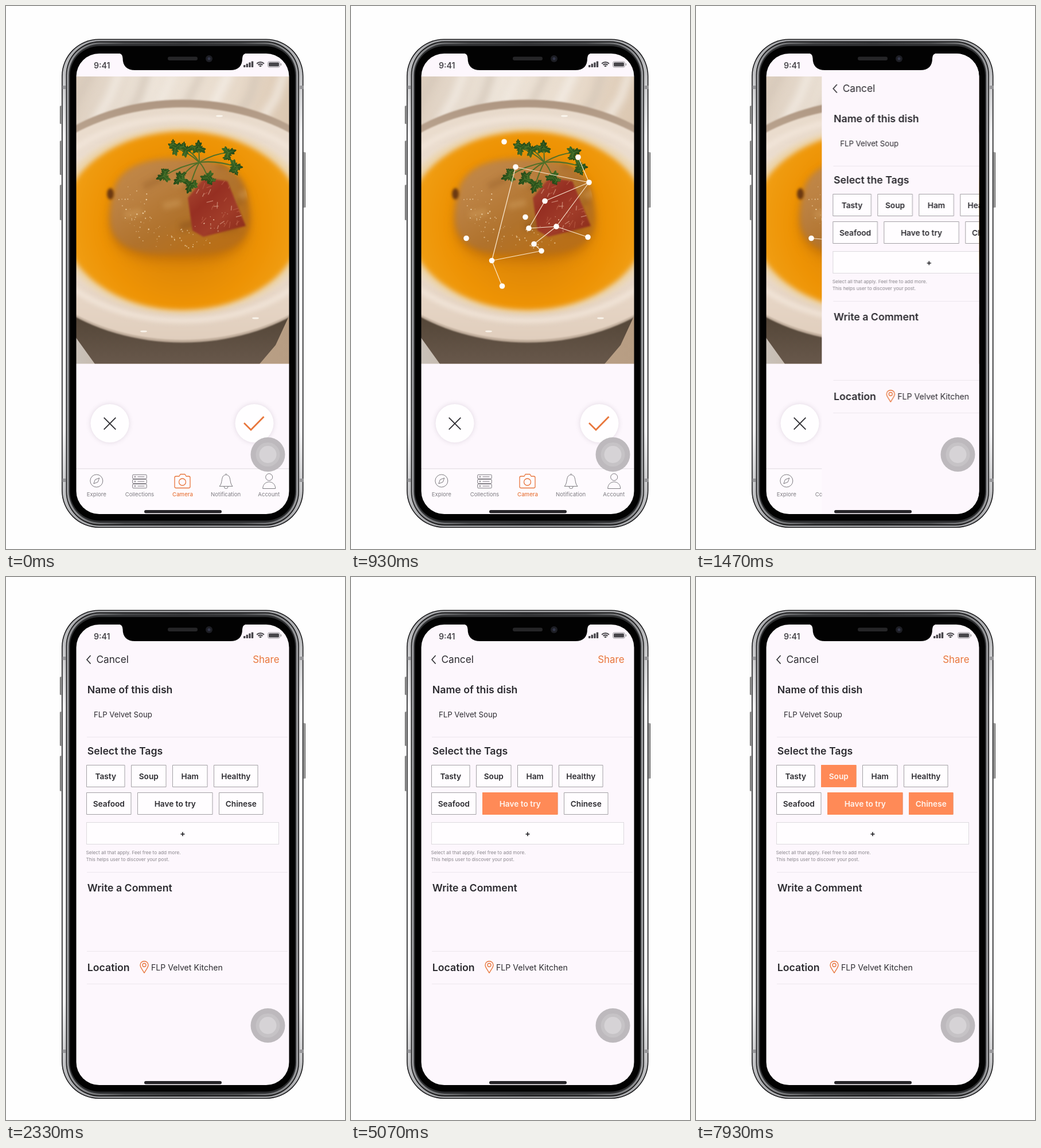
Animation, 591 px wide and 948 px high, one loop 8 s. Source, as an HTML page with a canvas:

```html
<!DOCTYPE html>
<html lang="en">
<head>
<meta charset="utf-8">
<title>Post a dish</title>
<style>
html, body { margin: 0; width: 100%; height: 100%; overflow: hidden; background: #fefefe; }
canvas { display: block; }
</style>
</head>
<body>
<canvas id="stage" width="591" height="948"></canvas>
<script>
const W = 591, H = 948, LOOP = 8000, TAU = Math.PI * 2;
const ORANGE = '#e8763c', PICKED = '#ff8a57', INK = '#2c2b30', GREY = '#7d7b80', PAPER = '#fdf7fd';
const VIEW = { x: 122.5, y: 83, w: 371, h: 804, r: 40 };
const stage = document.getElementById('stage').getContext('2d');
let g = stage;

const clamp = v => Math.min(1, Math.max(0, v));
const span = (t, from, to) => clamp((t - from) / (to - from));
const ease = p => (1 - Math.cos(Math.PI * p)) / 2;

function layer(draw) {
  const c = document.createElement('canvas');
  c.width = W;
  c.height = H;
  g = c.getContext('2d');
  draw();
  g = stage;
  return c;
}

function seeded(seed) {
  return () => (seed = (seed * 16807) % 2147483647) / 2147483647;
}

function fill(color) { g.fillStyle = color; g.fill(); }

function stroke(color, width = 1) {
  g.strokeStyle = color;
  g.lineWidth = width;
  g.stroke();
}

function rect(x, y, w, h, r = 0) {
  g.beginPath();
  g.roundRect(x, y, w, h, r);
}

function oval(x, y, rx, ry = rx) {
  g.beginPath();
  g.ellipse(x, y, rx, ry, 0, 0, TAU);
}

function poly(points, close) {
  g.beginPath();
  points.forEach(([x, y]) => g.lineTo(x, y));
  if (close) g.closePath();
}

// Closed curve with radius(angle), stretched to rx and ry.
function polar(x, y, rx, ry, radius) {
  const points = [];
  for (let a = 0; a < TAU; a += TAU / 90) {
    points.push([x + rx * radius(a) * Math.cos(a), y + ry * radius(a) * Math.sin(a)]);
  }
  poly(points, true);
}

function ramp(x0, y0, x1, y1, ...colors) {
  const grad = g.createLinearGradient(x0, y0, x1, y1);
  colors.forEach((c, i) => grad.addColorStop(i / (colors.length - 1), c));
  return grad;
}

// y is the middle of the capital letters.
function text(s, x, y, size, { weight = 400, color = INK, align = 'left' } = {}) {
  g.font = `${weight} ${size}px Inter, "Open Sans", sans-serif`;
  g.textAlign = align;
  g.fillStyle = color;
  g.fillText(s, x, y + size * 0.364);
}

function soft(blur, draw) {
  g.save();
  g.filter = `blur(${blur}px)`;
  draw();
  g.restore();
}

function leaf(x, y, size, turn) {
  g.save();
  g.translate(x, y);
  g.rotate(turn);
  polar(0, 0, size, size, a => 0.72 + 0.26 * Math.cos(3 * a) + 0.13 * Math.cos(11 * a));
  fill(ramp(-size, -size, size, size, '#4a7328', '#2f581d', '#1c3b12'));
  for (const a of [-2, 0, 2]) {
    poly([[0, 0], [size * 0.7 * Math.cos(a), size * 0.7 * Math.sin(a)]]);
    stroke('rgba(125,160,75,.5)', 0.8);
  }
  g.restore();
}

function herb() {
  const root = [337, 273];
  const tips = [[295, 248], [314, 251], [336, 248], [388, 256], [399, 280], [275, 297], [303, 302], [321, 314], [352, 300]];
  g.lineCap = 'round';
  for (const [x, y] of tips) {
    g.beginPath();
    g.moveTo(...root);
    g.quadraticCurveTo((x + root[0]) / 2, (y + root[1]) / 2 - 7, x, y);
    stroke('#506f28', 2);
  }
  for (const [x, y] of tips) {
    const out = Math.atan2(y - root[1], x - root[0]);
    leaf(x, y, 13, out);
    leaf(x + 7 * Math.sin(out), y + 8 * Math.cos(out), 8, out + 1);
  }
}

function bowl() {
  soft(1.2, () => {
    oval(308, 375.5, 304, 212);
    fill(ramp(0, 163, 0, 588, '#ae9681', '#c9b6a4', '#d5c5b5', '#c0ad9b'));
    oval(308, 380, 299, 203);
    fill(ramp(0, 178, 0, 584, '#e8dacb', '#eee0d3', '#ecdccd', '#e0cebd'));
  });
  soft(4, () => {
    oval(308, 372, 262, 177);
    stroke('#f2e6da', 8);
    oval(308, 374, 228, 164);
    fill('#ecd5ae');
  });
  soft(4, () => {
    oval(308, 375, 210, 156);
    const soup = g.createRadialGradient(308, 390, 40, 308, 375, 212);
    soup.addColorStop(0, '#da8408');
    soup.addColorStop(0.6, '#ee9304');
    soup.addColorStop(0.9, '#f09d12');
    soup.addColorStop(1, '#edae3f');
    fill(soup);
  });
}

function fish(rnd) {
  const outline = dy => polar(303, 352 + dy, 127, 88, a => 1 - 0.05 * Math.cos(4 * a) + 0.025 * Math.sin(3 * a));
  soft(9, () => {
    outline(12);
    fill('rgba(176,98,8,.5)');
  });
  soft(5, () => {
    outline(0);
    fill(ramp(200, 260, 320, 445, '#c48a49', '#bb8142', '#b0722c', '#b86f18'));
  });
  g.save();
  outline(0);
  g.clip();
  soft(5, () => {
    for (let i = 0; i < 16; i++) {
      const x = 180 + rnd() * 230, y = 270 + rnd() * 150;
      poly([[x, y], [x + 30, y - 16 * rnd()]]);
      stroke(i % 2 ? 'rgba(216,168,104,.4)' : 'rgba(130,76,28,.28)', 12);
    }
  });
  g.restore();
  soft(2, () => {
    oval(182, 328, 6, 10);
    fill('#6b3912');
  });
}

function ham(rnd) {
  const slice = [[317, 335], [346, 299], [386, 306], [418, 384], [344, 403], [325, 392]];
  soft(1.5, () => {
    poly(slice, true);
    fill(ramp(325, 310, 405, 395, '#a5432e', '#962f22', '#a03c29', '#8f2f1d'));
  });
  g.save();
  poly(slice, true);
  g.clip();
  for (let i = 0; i < 40; i++) {
    const x = 318 + rnd() * 92, y = 308 + rnd() * 88;
    poly([[x, y], [x + 12 * rnd(), y - 12 * rnd()]]);
    stroke(i % 3 ? 'rgba(200,112,86,.45)' : 'rgba(240,196,172,.5)', 1.4);
  }
  g.restore();
}

function photo() {
  const rnd = seeded(71);
  g.save();
  rect(122, 123, 372, 501.5);
  g.clip();
  g.fillStyle = ramp(123, 123, 493, 230, '#dccdbd', '#ede4d9', '#e9dccd', '#dac5ae');
  g.fillRect(122, 123, 372, 502);
  soft(7, () => {
    for (let i = 0; i < 8; i++) {
      const x = 125 + i * 48;
      poly([[x + 25, 115], [x + 12 * rnd(), 160], [x - 20, 205]]);
      stroke(i % 2 ? '#f3ece4' : '#d3c6b8', 6 + 8 * rnd());
    }
  });

  // Table and the foot of the bowl
  g.fillStyle = ramp(122, 0, 494, 0, '#c9c1b9', '#bda48b', '#b79d83');
  g.fillRect(122, 500, 372, 125);
  poly([[122, 500], [122, 579], [155, 625], [442, 625], [470, 592], [494, 540]], true);
  fill(ramp(0, 550, 0, 625, '#554739', '#68584b'));

  bowl();
  fish(rnd);
  ham(rnd);
  for (let i = 0; i < 90; i++) {
    const a = 0.2 + rnd() * 3.4, r = 0.5 + rnd() * 0.45;
    oval(302 + Math.cos(a) * 115 * r, 347 + Math.sin(a) * 86 * r, 0.4 + rnd() * 0.9);
    fill(`rgba(255,236,200,${0.3 + rnd() * 0.5})`);
  }
  for (const [x, y] of [[240, 568], [435, 545], [372, 192]]) {
    oval(x, y, 6, 1.6);
    fill('rgba(255,253,247,.8)');
  }
  herb();
  g.restore();
}

function statusBar() {
  text('9:41', 153, 104, 14.2, { weight: 600, color: '#4a484d' });
  for (let i = 0; i < 4; i++) {
    const h = 4 + i * 2.2;
    rect(414 + i * 4.6, 107 - h, 3.4, h, 0.8);
    fill('#47454a');
  }
  for (const r of [2.2, 5.6, 9]) {
    g.beginPath();
    g.arc(443.5, 107, r, -Math.PI * 0.75, -Math.PI * 0.25);
    stroke('#47454a', 2.1);
  }
  rect(456.5, 97, 21, 10, 2.8);
  stroke('#9d9b9f');
  rect(458, 98.5, 18, 7, 1.5);
  fill('#47454a');
  rect(478.7, 100, 1.6, 4, 1);
  fill('#9d9b9f');
}

function roundButton(x) {
  g.save();
  g.shadowColor = 'rgba(110,95,115,.2)';
  g.shadowBlur = 8;
  oval(x, 728.5, 33.5);
  fill('#fffeff');
  g.restore();
}

const icons = [
  function compass() {
    oval(0, 0, 11);
    poly2(() => oval(0, 0, 11));
    poly([[5, -5], [2.3, 2.2], [-5, 5], [-2.3, -2.2]], true);
    g.stroke();
  },
  function drawers() {
    for (const y of [-7.2, 1, 9.2]) {
      poly2(() => rect(-12.2, y - 3.5, 24.5, 7, 1.3));
      poly2(() => oval(-8, y, 1));
      poly2(() => poly([[-3.5, y], [8.5, y]]));
    }
  },
  function shutter() {
    poly2(() => oval(-0.5, 2, 6));
    poly2(() => {
      g.beginPath();
      g.moveTo(-6, -8);
      g.lineTo(-4, -11.5);
      g.lineTo(4, -11.5);
      g.lineTo(6, -8);
      g.arcTo(13, -8, 13, 12.5, 2.5);
      g.arcTo(13, 12.5, -14, 12.5, 2.5);
      g.arcTo(-14, 12.5, -14, -8, 2.5);
      g.arcTo(-14, -8, -6, -8, 2.5);
      g.closePath();
    });
  },
  function bell() {
    poly2(() => {
      g.beginPath();
      g.moveTo(-11, 9.5);
      g.bezierCurveTo(-4.5, 4, -9.5, -10.5, 0.5, -10.5);
      g.bezierCurveTo(10.5, -10.5, 5.5, 4, 12, 9.5);
      g.closePath();
      g.moveTo(4, 10);
      g.arc(0.5, 10, 3.5, 0, Math.PI);
      g.moveTo(0.5, -13);
      g.lineTo(0.5, -10.5);
    });
  },
  function person() {
    poly2(() => oval(0.5, -6.5, 6));
    poly2(() => {
      g.beginPath();
      g.moveTo(-10.5, 13.5);
      g.bezierCurveTo(-10.5, -2, 11.5, -2, 11.5, 13.5);
      g.closePath();
    });
  }
];

function poly2(path) {
  path();
  g.stroke();
}

function tabBar() {
  g.fillStyle = '#fefafe';
  g.fillRect(122, 808, 372, 80);
  g.fillStyle = '#e9e4ea';
  g.fillRect(122, 807, 372, 1.5);
  g.lineJoin = 'round';
  ['Explore', 'Collections', 'Camera', 'Notification', 'Account'].forEach((label, i) => {
    const x = 157.8 + i * 75.1, on = i === 2, color = on ? ORANGE : GREY;
    g.save();
    g.translate(x, 829);
    g.strokeStyle = color;
    g.lineWidth = on ? 1.3 : 1;
    icons[i]();
    g.restore();
    text(label, x, 852.7, 9.6, { align: 'center', weight: on ? 500 : 400, color });
  });
}

function camera() {
  g.fillStyle = PAPER;
  g.fillRect(122, 83, 372, 805);
  statusBar();
  photo();
  roundButton(181);
  roundButton(433);
  g.lineCap = 'butt';
  for (const s of [-1, 1]) {
    poly([[181 - 10.3 * s, 718.7], [181 + 10.3 * s, 739.3]]);
    stroke(INK, 1.8);
  }
  poly([[415, 728], [427, 740], [449.5, 717]]);
  stroke(ORANGE, 2.8);
  tabBar();
}

const rows = [
  { Tasty: 67, Soup: 61, Ham: 61, Healthy: 77 },
  { Seafood: 78, 'Have to try': 131, Chinese: 77 }
];
const taps = ['Have to try', 'Chinese', 'Soup'];
const tags = rows.flatMap((row, i) => {
  let x = 140.5;
  return Object.entries(row).map(([label, w]) => {
    const box = { label, x, y: 328.5 + i * 48, w: w - 0.5 };
    x += w + 11;
    return box;
  });
});

function tag({ label, x, y, w }, on) {
  rect(x, y, w, 38);
  fill(on ? PICKED : '#fffdff');
  stroke(on ? PICKED : '#a3a1a5');
  text(label, x + w / 2, y + 19.5, 13.7, { weight: 600, align: 'center', color: on ? '#fff4ee' : INK });
}

function form() {
  g.fillStyle = PAPER;
  g.fillRect(121, 83, 373, 805);
  statusBar();
  poly([[147.5, 137], [141, 144.2], [147.5, 151.5]]);
  stroke(INK, 1.6);
  text('Cancel', 157.5, 144, 17.2);
  text('Share', 476.5, 144, 16.9, { color: ORANGE, align: 'right' });

  const title = (s, y) => text(s, 141.8, y, 17.7, { weight: 600 });
  title('Name of this dish', 197);
  title('Select the Tags', 303.5);
  title('Write a Comment', 543);
  title('Location', 681.5);
  text('FLP Velvet Soup', 153, 240.5, 13.2);
  text('FLP Velvet Kitchen', 253, 681.5, 14.1);

  for (const y of [279.5, 515.5, 653.5, 710.5]) {
    poly([[141, y], [491, y]]);
    stroke('#ece6ed');
  }
  tags.forEach(box => tag(box, false));
  rect(140.5, 428.5, 335, 38);
  fill('#fffdff');
  g.setLineDash([1, 1]);
  stroke('#bbb8bd');
  g.setLineDash([]);
  text('+', 308, 448, 14, { weight: 700, align: 'center' });
  text('Select all that apply. Feel free to add more.', 139.5, 481.3, 8.2, { color: '#88858b' });
  text('This helps user to discover your post.', 139.5, 493.2, 8.2, { color: '#88858b' });

  g.beginPath();
  g.moveTo(241, 691.5);
  g.bezierCurveTo(238, 685, 234, 682, 234, 677.5);
  g.bezierCurveTo(234, 668.5, 248, 668.5, 248, 677.5);
  g.bezierCurveTo(248, 682, 244, 685, 241, 691.5);
  stroke(ORANGE, 1.4);
  oval(241, 677.5, 3);
  stroke(ORANGE, 1.3);
}

function phone() {
  const shell = (dx, dy, paint) => {
    rect(97 + dx, 57.5 + dy, 421.5 - 2 * dx, 853.5 - 2 * dy, 65 - (dx + dy) / 2);
    fill(paint);
  };
  const key = (x, y, h) => {
    rect(x, y, 5, h, 1.5);
    fill(ramp(x, 0, x + 5, 0, '#2a2a2a', '#d0d0d0', '#2a2a2a'));
  };
  key(94, 174, 32);
  key(94, 235, 60);
  key(94, 312, 62);
  key(517, 255, 97);

  shell(0, 0, '#1c1c1e');
  shell(1.6, 1.6, ramp(0, 57, 0, 912, '#a5a6a9', '#f4f4f5', '#fafafa', '#fafafa', '#f4f4f5', '#a5a6a9'));
  g.fillStyle = '#97979a';
  for (const y of [139, 825]) {
    g.fillRect(98, y, 6, 6);
    g.fillRect(512, y, 6, 6);
  }
  shell(7.5, 4, '#19191a');
  shell(9, 6, ramp(106, 0, 510, 0, '#9a9b9e', '#4a4b4d', '#38393b', '#4a4b4d', '#9a9b9e'));
  shell(12.5, 9, '#2e2f31');
  shell(14.5, 12.5, '#020202');
}

function overlay() {
  g.beginPath();
  g.moveTo(195, 82);
  g.quadraticCurveTo(203.5, 83, 203.5, 91);
  g.bezierCurveTo(203.5, 105, 211, 112, 225, 112);
  g.lineTo(391, 112);
  g.bezierCurveTo(405, 112, 412, 105, 412, 91);
  g.quadraticCurveTo(412, 83, 421, 82);
  g.closePath();
  fill('#020202');
  rect(282, 88.5, 52, 6.5, 3.2);
  fill('#252527');
  oval(354, 92, 6);
  fill('#1d1e24');
  oval(354, 92, 2.5);
  fill('#34374a');
  rect(241, 880, 135, 5.5, 2.7);
  fill('#262428');
  [[30, '#bdb9bd'], [21, '#c6c3c6'], [15, '#d6d3d6']].forEach(([r, color]) => {
    oval(456.5, 783, r);
    fill(color);
  });
}

const dots = {
  A: [263.5, 489], B: [245.5, 444.5], C: [287, 281], D: [415, 308], E: [338, 340.5],
  F: [310, 388], G: [358, 385], H: [319, 415.5], I: [332, 427.5], J: [413, 403.5],
  K: [396, 264], L: [267, 237], M: [304, 368.5], N: [201, 405.5]
};

function chain(names, p) {
  for (let i = 1; i < names.length && p > 0; i++) {
    const [x, y] = dots[names[i - 1]], [ex, ey] = dots[names[i]];
    poly([[x, y], [x + (ex - x) * p, y + (ey - y) * p]]);
    stroke('rgba(255,240,218,.95)', 1.2);
  }
}

function mesh(t) {
  const first = ease(span(t, 640, 930)), second = ease(span(t, 930, 1150));
  for (const names of ['ABCDEFGHIB', 'DGJ', 'KD']) chain(names, first);
  chain('LCMEHN', second);
  const r = 4.8 * ease(span(t, 540, 680));
  for (const [x, y] of Object.values(dots)) {
    oval(x, y, r);
    fill('#fffdfb');
  }
}

const cameraLayer = layer(camera), formLayer = layer(form);
const phoneLayer = layer(phone), overlayLayer = layer(overlay);

function frame(now) {
  const t = now % LOOP;
  const slide = ease(span(t, 1130, 1650));
  g.fillStyle = '#fefefe';
  g.fillRect(0, 0, W, H);
  g.drawImage(phoneLayer, 0, 0);
  g.save();
  rect(VIEW.x, VIEW.y, VIEW.w, VIEW.h, VIEW.r);
  g.clip();
  if (slide < 1) {
    g.drawImage(cameraLayer, 0, 0);
    mesh(t);
  }
  if (slide > 0) {
    g.translate(VIEW.w * (1 - slide), 0);
    g.drawImage(formLayer, 0, 0);
    taps.forEach((label, i) => {
      const start = 4300 + i * 1400;
      g.globalAlpha = ease(span(t, start, start + 200));
      tag(tags.find(box => box.label === label), true);
    });
  }
  g.restore();
  g.drawImage(overlayLayer, 0, 0);
  requestAnimationFrame(frame);
}
requestAnimationFrame(frame);
</script>
</body>
</html>
```
